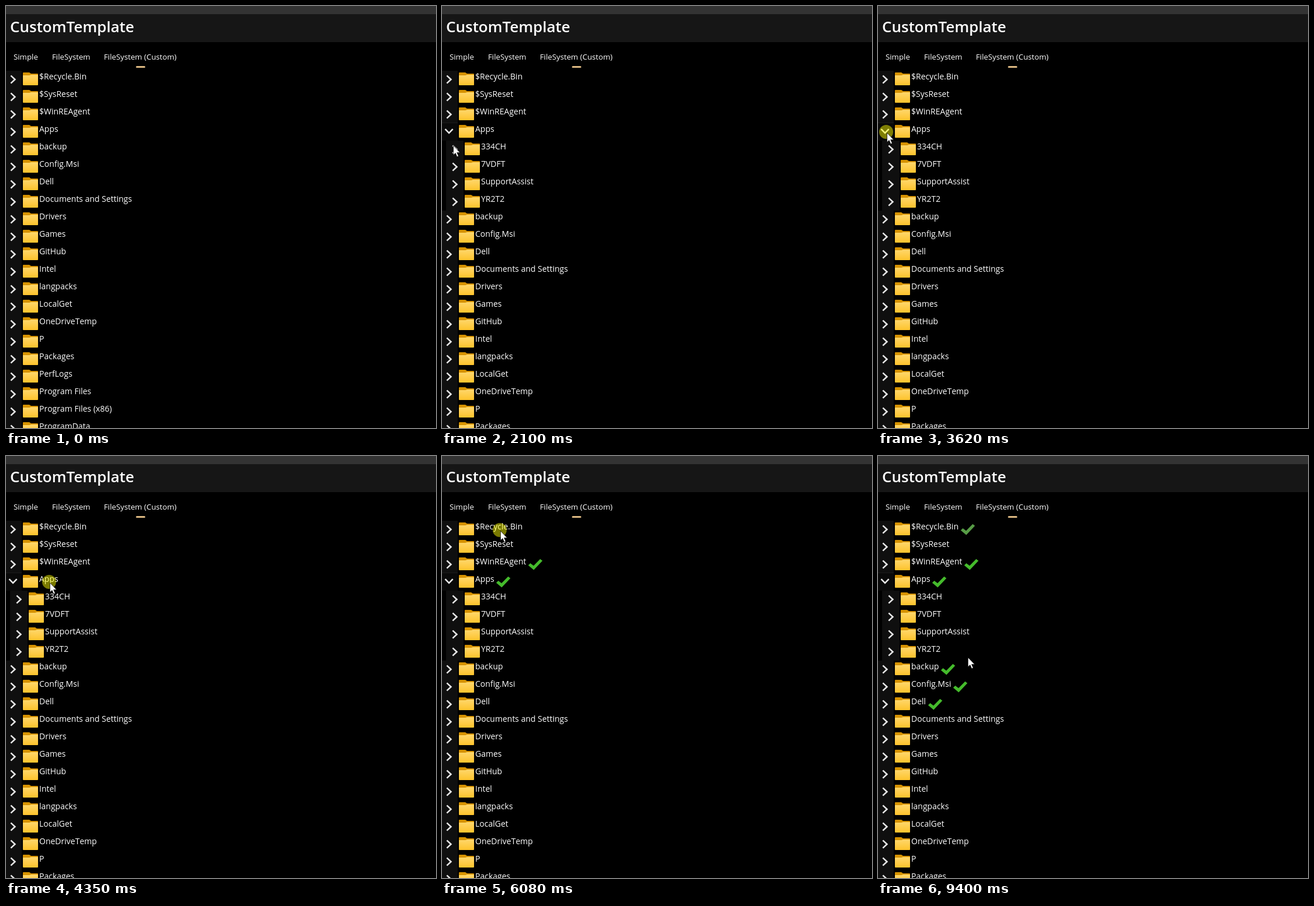
Recreate the animation shown at these times as an HTML page. Size 738x724 px, loop 9470 ms.

```html
<!DOCTYPE html>
<html lang="en">
<head>
<meta charset="utf-8">
<title>CustomTemplate</title>
<style>
  html, body { margin: 0; width: 100%; height: 100%; overflow: hidden; background: #000; }
  svg { display: block; width: 738px; height: 724px; }
  text { fill: #fff; font: 14px "Open Sans", "Noto Sans", sans-serif; font-kerning: none; }
  .title { font-size: 26px; font-weight: 600; font-kerning: normal; }
  .tab { font-size: 13.25px; }
  .chevron { fill: none; stroke: #e6e6e6; stroke-width: 2.6; }
  .hidden { display: none; }
</style>
</head>
<body>
<svg viewBox="0 0 738 724">
  <defs>
    <linearGradient id="gold" x1="0" y1="0" x2="0" y2="1">
      <stop offset="0" stop-color="#ffd76b"/>
      <stop offset="1" stop-color="#fdc32c"/>
    </linearGradient>
    <g id="folder">
      <path d="M0 9V1Q0 0 1 0H11L14 2H25Q26 2 26 3V9Z" fill="#d69200"/>
      <path d="M0 5H11L14 4H26V21Q26 22 25 22H1Q0 22 0 21Z" fill="url(#gold)"/>
    </g>
    <path id="tick" d="M0 11L3.6 7.5 9.2 11.8 20.5 .2 24.4 3.2 9.5 19Z"/>
  </defs>
  <rect width="738" height="14" fill="#333"/>
  <rect y="14" width="738" height="48" fill="#161616"/>
  <text class="title" x="7" y="45">CustomTemplate</text>
  <text class="tab" x="13" y="92">Simple</text>
  <text class="tab" x="79" y="92">FileSystem</text>
  <text class="tab" x="168" y="92">FileSystem (Custom)</text>
  <rect x="223" y="103" width="16" height="3" rx="1.5" fill="#ddb982"/>
  <g id="head"></g>
  <g id="kids"></g>
  <g id="tail"></g>
  <g id="pointer">
    <circle id="press" cx="-1" cy="-1" r="12" fill="#ff0" fill-opacity=".48"/>
    <path d="M.5 .7v16l3.6-3.3 2.7 6.3 2.6-1.1-2.7-6.2h5.2Z" fill="#fff" stroke="#000" stroke-width=".7"/>
  </g>
</svg>
<script>
const LOOP = 9470, ROW = 30, TOP = 111;
const HEAD = ["$Recycle.Bin", "$SysReset", "$WinREAgent", "Apps"];
const KIDS = ["334CH", "7VDFT", "SupportAssist", "YR2T2"];
const TAIL = ["backup", "Config.Msi", "Dell", "Documents and Settings", "Drivers", "Games",
  "GitHub", "Intel", "langpacks", "LocalGet", "OneDriveTemp", "P", "Packages", "PerfLogs",
  "Program Files", "Program Files (x86)", "ProgramData"];

// Pointer stops: arrival time, place, and what a click there does
const STOPS = [
  [440, 587, 619],
  [1440, 14, 211, "toggle"],
  [2250, 20, 245],
  [3480, 15, 217, "toggle"],
  [3850, 15, 217, "toggle"],
  [4290, 75, 217, "Apps"],
  [5140, 88, 185, "$WinREAgent"],
  [5980, 100, 128, "$Recycle.Bin"],
  [7080, 14, 471],
  [7660, 54, 418],
  [8030, 50, 418, "Dell"],
  [8430, 84, 393, "Config.Msi"],
  [8930, 86, 364, "backup"],
  [9395, 86, 364],
  [9396, 154, 345]
].map(([at, x, y, click]) => ({ at, x, y, click }));
const REST = 260, TRAVEL = 930;   // shortest stay, longest move
const DOWN = 50, UP = 200;        // press and release after arrival

const $ = id => document.getElementById(id);
const show = (el, on) => el.classList.toggle("hidden", !on);
function add(parent, tag, attrs, text) {
  const el = document.createElementNS("http://www.w3.org/2000/svg", tag);
  for (const k in attrs) el.setAttribute(k, attrs[k]);
  if (text) el.textContent = text;
  return parent.appendChild(el);
}

const CLOSED = "M8.3 8.4l7.1 6.6-7.1 6.6", OPEN = "M5.4 10.2l6.6 6.8 6.6-6.8";
const rows = {};
function addRows(id, names, first, indent) {
  names.forEach((name, i) => {
    const y = TOP + (first + i) * ROW;
    const g = add($(id), "g", { transform: `translate(${indent} ${y})` });
    const x = indent ? -3 : 0;
    const button = add(g, "rect", { x, width: 27 - x, height: ROW, fill: "#0f0f0f" });
    const chevron = add(g, "path", { class: "chevron", d: CLOSED });
    add(g, "use", { href: "#folder", x: 29, y: 3 });
    const label = add(g, "text", { x: 57, y: 15 }, name);
    rows[name] = { g, button, chevron, label };
  });
}
addRows("head", HEAD, 0, 0);
addRows("kids", KIDS, 4, 10);
addRows("tail", TAIL, 4, 0);
const apps = rows.Apps;
const rim = add(apps.g, "path", { d: "M0 -.5H27", stroke: "#1c1c1c" });

const clicks = STOPS.filter(s => s.click);
const toggles = clicks.filter(s => s.click === "toggle");
const ticks = clicks.filter(s => rows[s.click]).map(s => {
  const { g, label } = rows[s.click];
  const x = Math.round(57 + label.getComputedTextLength() + 3.5);
  const fill = s.click === HEAD[0] ? "#579c46" : "#45bb2c";
  return { at: s.at + UP, el: add(g, "use", { href: "#tick", x, y: 5.5, fill }) };
});

function tipAt(t) {
  const i = STOPS.findLastIndex(s => s.at <= t);
  const a = STOPS[i], b = STOPS[i + 1];
  if (!b) return [a.x, a.y];
  const rest = a.click ? REST : 0;
  const from = Math.min(b.at - 1, Math.max(a.at + rest, b.at - TRAVEL));
  const u = Math.max(0, (t - from) / (b.at - from));
  const e = u * u * (3 - 2 * u);
  return [a.x + (b.x - a.x) * e, a.y + (b.y - a.y) * e];
}

function draw(t) {
  const open = toggles.filter(s => t >= s.at + UP).length % 2 === 1;
  show($("kids"), open);
  show(rim, open);
  $("tail").setAttribute("transform", `translate(0 ${open ? KIDS.length * ROW : 0})`);
  apps.chevron.setAttribute("d", open ? OPEN : CLOSED);
  apps.button.setAttribute("fill", open ? "#090909" : t >= toggles[0].at ? "#161616" : "#0f0f0f");
  ticks.forEach(k => show(k.el, t >= k.at));

  const live = t >= STOPS[0].at;
  show($("pointer"), live);
  if (!live) return;
  const [x, y] = tipAt(t).map(Math.round);
  $("pointer").setAttribute("transform", `translate(${x} ${y})`);
  show($("press"), clicks.some(s => t >= s.at + DOWN && t < s.at + UP));
}

const start = performance.now();
function frame() {
  draw((performance.now() - start) % LOOP);
  requestAnimationFrame(frame);
}
frame();
</script>
</body>
</html>
```
